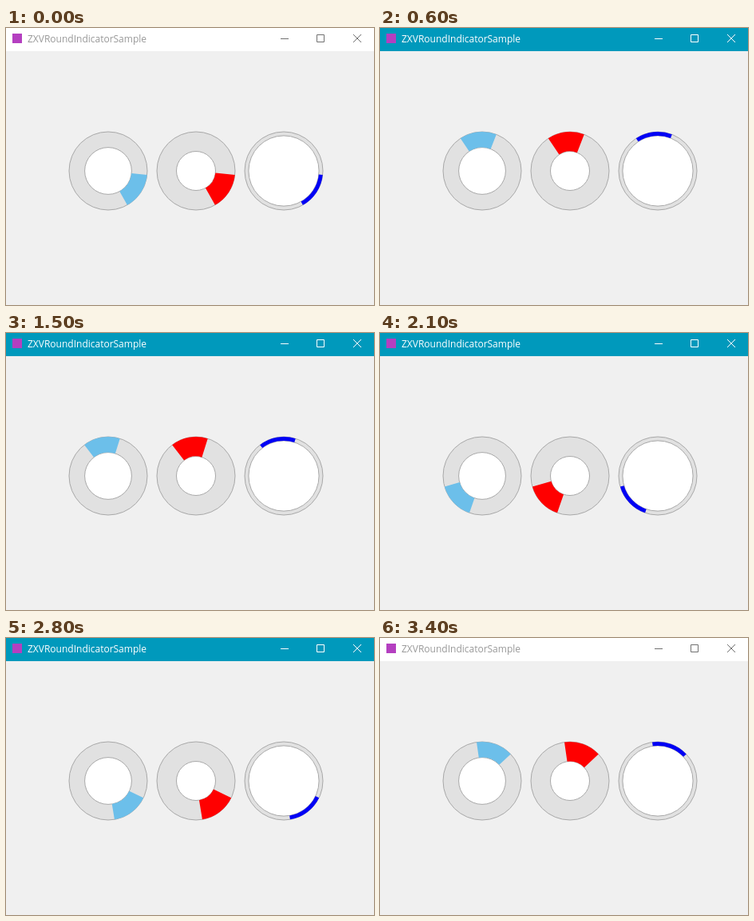
Animation of 461 by 347 pixels, one loop 3500 ms. Source, as an HTML page:

```html
<!DOCTYPE html>
<html lang="en">
<head>
<meta charset="utf-8">
<title>Round indicators</title>
<style>
  html, body { margin: 0; width: 100%; height: 100%; overflow: hidden; background: #f0f0f0; }
  svg { display: block; }
  #bar { fill: #fff; color: #707070; }
  #bar text { fill: #999; font: 12px "Open Sans", "Noto Sans", sans-serif; }
  #bar.active { fill: #0099bc; color: #fff; }
  #bar.active text { fill: #fff; }
  #bar path { fill: none; stroke: currentColor; }
  circle { stroke: #a8a8a8; }
</style>
</head>
<body>
<svg width="461" height="347" viewBox="0 0 461 347">
  <g id="bar">
    <rect width="461" height="29"/>
    <rect x="8" y="7" width="12" height="12" fill="#b43fc0"/>
    <text x="27" y="18">ZXVRoundIndicatorSample</text>
    <path d="M344 13.5h10M389.5 8.5h9v9h-9zM435 8l10 10M445 8l-10 10"/>
  </g>
  <g id="rings"></g>
</svg>
<script>
const LOOP = 3500, STEP = 100, SPAN = 55, RADIUS = 49, CY = 179;
const rings = [
  { x: 128, inner: 29.4, color: '#6cbfea' },
  { x: 238, inner: 24.5, color: '#ff0000' },
  { x: 348, inner: 44.1, color: '#0000f5' }
];
// Time in ms and leading angle in degrees, clockwise from the right
const turns = [[0, 5.8], [600, 236.3], [1000, 392], [1500, 592.5],
               [2100, 829], [2800, 1105.7], [3400, 1341.8]];
const bar = document.getElementById('bar');
const group = document.getElementById('rings');

function add(tag, attrs) {
  const el = document.createElementNS('http://www.w3.org/2000/svg', tag);
  for (const key in attrs) el.setAttribute(key, attrs[key]);
  return group.appendChild(el);
}

for (const ring of rings) {
  add('circle', { cx: ring.x, cy: CY, r: RADIUS, fill: '#e1e1e1' });
  add('circle', { cx: ring.x, cy: CY, r: ring.inner, fill: '#fff' });
  ring.wedge = add('path', { fill: ring.color });
}

function angleAt(t) {
  const i = Math.max(1, turns.findIndex(turn => turn[0] >= t));
  const [t0, a0] = turns[i - 1], [t1, a1] = turns[i];
  return a0 + (a1 - a0) * (t - t0) / (t1 - t0);
}

function wedgePath({ x, inner }, angle) {
  const point = (r, deg) => {
    const a = deg * Math.PI / 180;
    return `${(x + r * Math.cos(a)).toFixed(2)} ${(CY + r * Math.sin(a)).toFixed(2)}`;
  };
  const end = angle + SPAN;
  return `M${point(inner, angle)}L${point(RADIUS, angle)}` +
    `A${RADIUS} ${RADIUS} 0 0 1 ${point(RADIUS, end)}` +
    `L${point(inner, end)}A${inner} ${inner} 0 0 0 ${point(inner, angle)}Z`;
}

function draw() {
  const t = Math.floor(performance.now() % LOOP / STEP) * STEP;
  const angle = angleAt(t);
  bar.classList.toggle('active', t >= 300 && t < 3300);
  for (const ring of rings) ring.wedge.setAttribute('d', wedgePath(ring, angle));
  requestAnimationFrame(draw);
}
draw();
</script>
</body>
</html>
```
